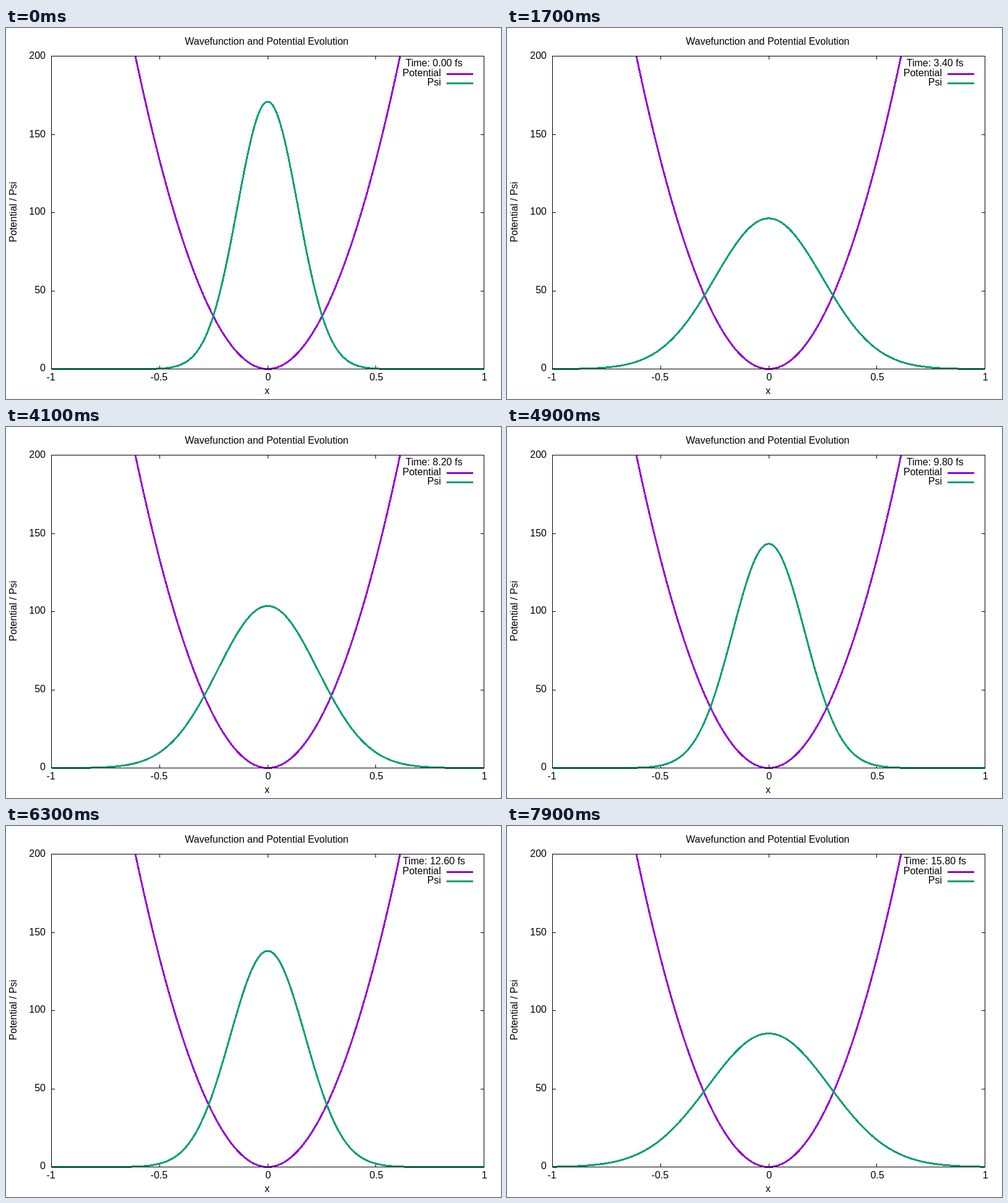
An HTML page that plays this animation: 800x600 px, repeating every 8000 ms.

```html
<!DOCTYPE html>
<html lang="en">
<head>
<meta charset="utf-8">
<title>Wavefunction and Potential Evolution</title>
<style>
  html, body { margin: 0; width: 100%; height: 100%; overflow: hidden; background: #fff; }
  svg { display: block; }
  text { font: 16px "Liberation Sans", Arial, sans-serif; fill: #000; }
  path, rect { fill: none; shape-rendering: crispEdges; }
  .frame { stroke: #000; stroke-width: 1; }
  .potential { stroke: #9400d3; stroke-width: 3; }
  .psi { stroke: #009e73; stroke-width: 3; }
  .end { text-anchor: end; }
  .mid { text-anchor: middle; }
</style>
</head>
<body>
<svg width="800" height="600" viewBox="0 0 800 600">
  <clipPath id="area"><rect x="73" y="45" width="700" height="508"/></clipPath>
  <text x="289" y="27">Wavefunction and Potential Evolution</text>
  <text class="mid" x="422" y="592">x</text>
  <text class="mid" transform="translate(17 297.5) rotate(-90)">Potential / Psi</text>
  <g id="labels"></g>
  <path id="ticks" class="frame"/>
  <text id="time" class="mid" x="691.7" y="62"></text>
  <text class="end" x="703" y="78">Potential</text>
  <text class="end" x="703" y="93">Psi</text>
  <g clip-path="url(#area)">
    <path id="potential" class="potential"/>
    <path class="potential" d="M712 74.5H755"/>
    <path id="psi" class="psi"/>
    <path class="psi" d="M712 89.5H755"/>
  </g>
  <rect class="frame" x="73.5" y="45.5" width="699" height="506"/>
</svg>
<script>
  const LOOP = 8000, STEP = 100, FS_PER_STEP = 0.2;
  const STIFFNESS = 534;                 // potential = STIFFNESS * x^2
  const PEAK = 170.9, SIGMA = 0.14;      // initial packet
  const OMEGA = 0.28264, SPREAD = 3.2;   // breathing of its variance

  const $ = id => document.getElementById(id);
  const px = x => 73.5 + (x + 1) * 349.5;
  const py = v => 551.5 - v * 2.53;

  function curve(f, from, to, n = 400) {
    let d = "";
    for (let i = 0; i <= n; i++) {
      const x = from + (to - from) * i / n;
      d += (i ? "L" : "M") + px(x).toFixed(2) + " " + py(f(x)).toFixed(2);
    }
    return d;
  }

  function label(text, x, y, cls) {
    const el = document.createElementNS("http://www.w3.org/2000/svg", "text");
    el.setAttribute("x", x);
    el.setAttribute("y", y);
    el.setAttribute("class", cls);
    el.textContent = text;
    $("labels").append(el);
  }

  let ticks = "";
  for (let i = 0; i < 5; i++) {
    const v = i * 50, x = i / 2 - 1;
    const ty = Math.floor(py(v)) + 0.5 - (i === 1 || i === 3 ? 0 : 0);
    const tx = Math.floor(px(x)) + 0.5;
    label(v, 64, Math.floor(py(v)) + (i === 3 ? 5 : 4) + (i === 4 ? 1 : 0), "end");
    label(x, px(x) + (x < 0 ? -0.9 : 0.8), 570, "mid");
    if (i > 0 && i < 4) {
      ticks += `M73 ${ty}h6M773 ${ty}h-6M${tx} 45v6M${tx} 552v-6`;
    }
  }
  $("ticks").setAttribute("d", ticks);
  $("potential").setAttribute("d", curve(x => STIFFNESS * x * x, -0.62, 0.62));

  let shown = -1;
  function draw() {
    const step = Math.floor(performance.now() % LOOP / STEP);
    if (step !== shown) {
      shown = step;
      const t = step * FS_PER_STEP;
      const growth = 1 + SPREAD * Math.sin(OMEGA * t) ** 2;
      const height = PEAK / Math.sqrt(growth);
      const variance = SIGMA * SIGMA * growth;
      $("psi").setAttribute("d", curve(x => height * Math.exp(-x * x / (2 * variance)), -1, 1));
      $("time").textContent = `Time: ${t.toFixed(2)} fs`;
    }
    requestAnimationFrame(draw);
  }
  draw();
</script>
</body>
</html>
```
